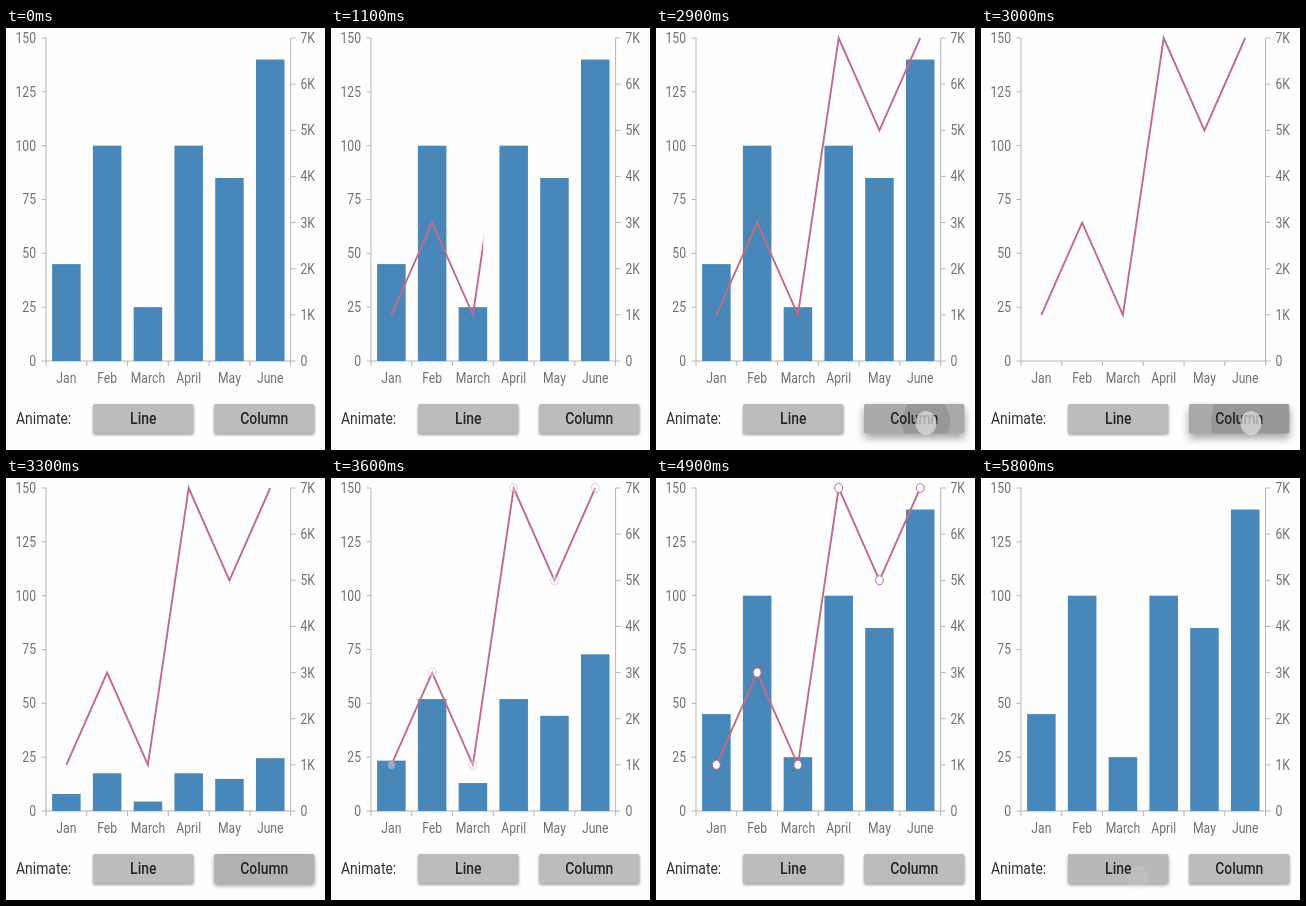
Write an HTML page with a canvas that moves like this. It is 319 px wide and 422 px high and loops after 6000 ms.

```html
<!DOCTYPE html>
<html lang="en">
<head>
<meta charset="utf-8">
<title>Column and line chart</title>
<style>
  html, body { margin: 0; width: 100%; height: 100%; overflow: hidden; background: #fefefe; }
  canvas { display: block; }
</style>
</head>
<body>
<canvas id="stage" width="319" height="422"></canvas>
<script>
const ctx = document.getElementById('stage').getContext('2d');
const LOOP = 6000, STEP = 100;
const SQUEEZE = 0.87; // the whole picture is narrowed horizontally
const LEFT = 40, RIGHT = 284.6, TOP = 10, BOTTOM = 333;
const AXIS = '#b5b5ba', BAR = '#4a87b9', LINE = '#c06c84';
const months = ['Jan', 'Feb', 'March', 'April', 'May', 'June'];
const columns = [45, 100, 25, 100, 85, 140];
const values = [1, 3, 1, 7, 5, 7];
const slot = (RIGHT - LEFT) / months.length;
const centre = i => LEFT + slot * (i + 0.5);
const yAt = share => BOTTOM - (BOTTOM - TOP) * share;
const points = values.map((v, i) => [centre(i), yAt(v / 7)]);

const ramp = (t, from, to) => Math.min(1, Math.max(0, (t - from) / (to - from)));
const easeOut = u => 1 - (1 - u) ** 2;

function text(str, x, y, size, color, align = 'center', weight = 400) {
  ctx.save();
  ctx.translate(x, y);
  ctx.scale(SQUEEZE, 1);
  ctx.font = `${weight} ${size}px Roboto, sans-serif`;
  ctx.textAlign = align;
  ctx.fillStyle = color;
  ctx.fillText(str, 0, size * 0.355);
  ctx.restore();
}

function segment(x1, y1, x2, y2) {
  ctx.beginPath();
  ctx.moveTo(x1, y1);
  ctx.lineTo(x2, y2);
  ctx.stroke();
}

function disc(x, y, r) {
  ctx.beginPath();
  ctx.ellipse(x, y, r * SQUEEZE, r, 0, 0, 2 * Math.PI);
}

function drawAxes() {
  ctx.strokeStyle = AXIS;
  ctx.lineWidth = 1;
  segment(LEFT, TOP, LEFT, BOTTOM);
  segment(RIGHT, TOP, RIGHT, BOTTOM);
  segment(LEFT, BOTTOM, RIGHT, BOTTOM);
  for (let i = 0; i <= 6; i++) {
    const y = yAt(i / 6), x = LEFT + slot * i;
    segment(LEFT - 4.5, y, LEFT, y);
    segment(x, BOTTOM, x, BOTTOM + 5);
    text(i * 25, 30, y, 14, '#717171', 'right');
  }
  for (let k = 0; k <= 7; k++) {
    const y = yAt(k / 7);
    segment(RIGHT, y, RIGHT + 5, y);
    text(k ? k + 'K' : '0', 294.5, y, 14, '#717171', 'left');
  }
  months.forEach((m, i) => text(m, centre(i), 350.5, 14, '#717171'));
}

function drawColumns(growth) {
  ctx.fillStyle = BAR;
  columns.forEach((v, i) => {
    const y = yAt(v / 150 * growth);
    ctx.fillRect(centre(i) - slot * 0.35, y, slot * 0.7, BOTTOM - y);
  });
}

function drawLine(edge, markerAlpha) {
  ctx.save();
  ctx.beginPath();
  ctx.rect(LEFT, 0, edge - LEFT, BOTTOM);
  ctx.clip();
  ctx.strokeStyle = LINE;
  ctx.lineWidth = 1.9;
  ctx.beginPath();
  points.forEach(p => ctx.lineTo(...p));
  ctx.stroke();
  ctx.restore();

  ctx.save();
  ctx.globalAlpha = markerAlpha;
  ctx.fillStyle = '#fff';
  ctx.strokeStyle = LINE;
  for (const [x, y] of points) {
    disc(x, y, 4.5);
    ctx.fill();
    ctx.stroke();
  }
  ctx.restore();
}

// press: { x, y, ripple radius, amount 0..1, pointer opacity }
function drawButton(label, x, press) {
  const y = 376, w = 100.5, h = 29.5;
  ctx.save();
  ctx.shadowColor = 'rgba(0,0,0,.38)';
  ctx.shadowBlur = 3 + 6 * press.amount;
  ctx.shadowOffsetY = 1.5 + 3 * press.amount;
  ctx.fillStyle = '#bdbcbd';
  ctx.beginPath();
  ctx.roundRect(x, y, w, h, 2);
  ctx.fill();
  ctx.restore();

  ctx.save();
  ctx.clip();
  ctx.fillStyle = `rgba(0,0,0,${0.1 * press.amount})`;
  ctx.fillRect(x, y, w, h);
  disc(press.x, press.y, press.radius);
  ctx.fill();
  ctx.restore();

  text(label, x + w / 2, 390.8, 16, '#262626', 'center', 500);
  ctx.fillStyle = `rgba(225,225,225,${0.7 * press.pointer})`;
  disc(press.x, press.y, 12);
  ctx.fill();
}

function draw(t) {
  ctx.fillStyle = '#fefefe';
  ctx.fillRect(0, 0, 319, 422);
  drawAxes();
  drawColumns(t < 3000 ? 1 : easeOut(ramp(t, 3172, 4566)));
  if (t < 5700) {
    const edge = LEFT + 254.6 * easeOut(ramp(t, 290, 3500));
    drawLine(edge, ramp(t, 3450, 3900));
  }
  text('Animate:', 10, 390.8, 16, '#333', 'left');
  drawButton('Line', 87, {
    x: 157, y: 400,
    radius: 90 * ramp(t, 5550, 5800),
    amount: 0.5 * (ramp(t, 5500, 5600) - ramp(t, 5600, 5850)),
    pointer: ramp(t, 5500, 5600) - ramp(t, 5600, 5850)
  });
  drawButton('Column', 208, {
    x: 270, y: 395,
    radius: 46 * ramp(t, 2750, 3000) + 40 * ramp(t, 3000, 3200),
    amount: ramp(t, 2700, 2900) - ramp(t, 3050, 3400),
    pointer: ramp(t, 2700, 2800) - ramp(t, 3000, 3150)
  });
}

const start = performance.now();
function frame() {
  const t = (performance.now() - start) % LOOP;
  draw(Math.min(5800, Math.floor(t / STEP) * STEP));
  requestAnimationFrame(frame);
}
frame();
</script>
</body>
</html>
```
